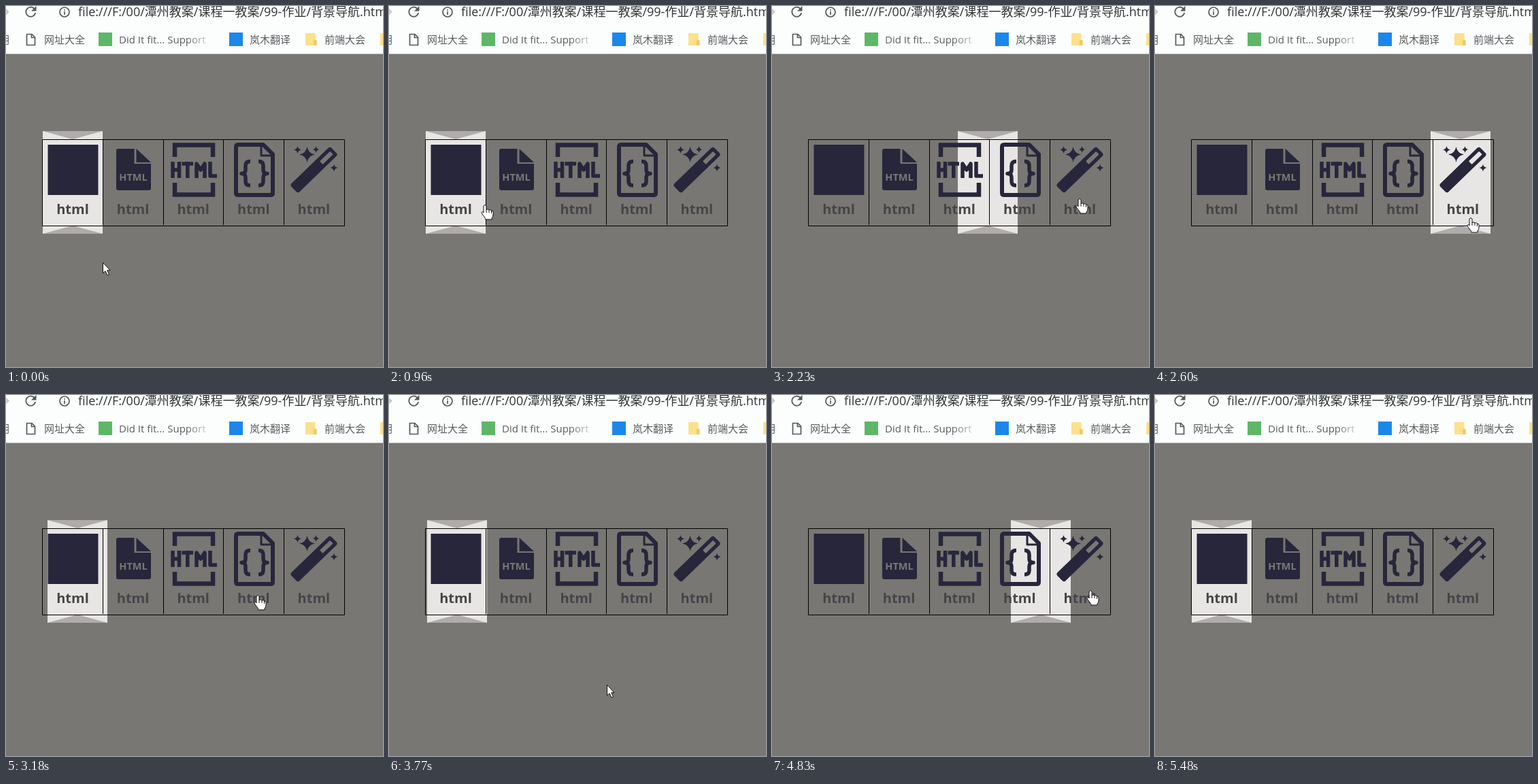
An HTML page for the animation above (5.98 s loop, 554 by 531 pixels).

```html
<!DOCTYPE html>
<html lang="zh">
<head>
<meta charset="utf-8">
<title>Ribbon navigation</title>
<style>
html, body { margin: 0; width: 100%; height: 100%; overflow: hidden; background: #787774; }
svg { display: block; width: 554px; height: 531px; font-family: "Open Sans", "Noto Sans CJK SC", "Noto Sans CJK", sans-serif; }
.mark { font-size: 15px; fill: #5a5c5f; }
.label { font-size: 20px; font-weight: 700; fill: #464447; text-anchor: middle; }
.line { fill: none; stroke: #27263a; stroke-linejoin: round; }
.grey { fill: none; stroke: #55585c; stroke-width: 1.7; }
</style>
</head>
<body>
<svg viewBox="0 0 554 531">
  <defs>
    <linearGradient id="fade" gradientUnits="userSpaceOnUse" x1="265" y1="0" x2="306" y2="0">
      <stop stop-color="#5a5c5f"/><stop offset="1" stop-color="#5a5c5f" stop-opacity="0"/>
    </linearGradient>
    <mask id="cut" maskUnits="userSpaceOnUse" x="155" y="200" width="65" height="80">
      <rect x="155" y="200" width="65" height="80" fill="#fff"/>
      <text x="187" y="257" font-size="14.5" font-weight="700" text-anchor="middle">HTML</text>
    </mask>
    <g id="folder">
      <path d="M0 0H14.5V9L16.500 11V18H0Z" fill="#fce08a"/>
      <path d="M12 18V10H15.500L16.500 11V18Z" fill="#f3ca5d"/>
    </g>
    <path id="spark" d="M0-1Q.15-.15 1 0 .15.15 0 1-.15.15-1 0-.15-.15 0-1Z"/>
  </defs>

  <rect width="554" height="531" fill="#787774"/>

  <!-- browser bar -->
  <rect width="554" height="70" fill="#fcfdfd"/>
  <path d="M0 70.5H554" stroke="#b9b9b8"/>
  <path d="M-4 8.5H3M-2 3L3.500 8.500-2 14" class="grey" opacity=".35"/>
  <path d="M42.300 5A7 7 0 1 0 43.200 10" class="grey"/>
  <path d="M44.500 0V7.500H37Z" fill="#55585c"/>
  <circle cx="86" cy="9" r="7" class="grey"/>
  <path d="M86 8V13M86 5V6.700" class="grey"/>
  <text x="106" y="15" font-size="18" fill="#323437">file:///F:/00/潭州教案/课程一教案/99-作业/背景导航.html</text>

  <g class="mark">
    <text x="-9.5" y="55">用</text>
    <text x="56" y="55">网址大全</text>
    <text x="166" y="55" fill="url(#fade)">Did It fit... Support</text>
    <text x="358" y="55">岚木翻译</text>
    <text x="468" y="55">前端大会</text>
  </g>
  <path d="M30.500 41.500H38L42.500 46V57.500H30.500ZM37.500 41.500V46.500H42.500" class="grey"/>
  <rect x="136" y="39" width="20" height="20" fill="#5db766"/>
  <rect x="328" y="39" width="20" height="20" fill="#1b87ea"/>
  <use href="#folder" x="440" y="40"/>
  <use href="#folder" x="550" y="40"/>

  <g id="ribbon">
    <path d="M0 184H88V335H0Z" fill="#e8e6e4"/>
    <path d="M0 184H88L44 196ZM0 335H88L44 323Z" fill="#b0acab"/>
  </g>

  <g fill="#27263a">
    <rect x="61.5" y="204" width="74" height="74"/>
    <g mask="url(#cut)">
      <path d="M165 210H188.500V232H213V268Q213 271 210 271H165Q162 271 162 268V213Q162 210 165 210Z"/>
      <path d="M191.500 210L213 230H191.500Z"/>
    </g>
    <g class="line" stroke-width="5.5">
      <path d="M248 222V204.500H304V222M248 260V277.500H304V260" stroke-width="6.5" stroke-linejoin="miter"/>
      <path d="M245 229V253M254.500 229V253M245 241H254.500M258.500 232H275M266.800 229V253M280 253V232L286 241 292 232V253M300 229V250H310"/>
      <path d="M341 204H378L392 218V275Q392 278 389 278H341Q338 278 338 275V207Q338 204 341 204Z" stroke-width="6"/>
      <path d="M375 204V220H392" stroke-width="3"/>
      <path id="brace" d="M359 228.500Q352 228.500 352 235V241Q352 246.500 346 246.500 352 246.500 352 252V258Q352 264 359 264"/>
      <use href="#brace" transform="translate(730) scale(-1 1)"/>
    </g>
    <g transform="translate(452.5 241) rotate(-44)">
      <rect x="-41" y="-8.5" width="82" height="17" rx="3.5"/>
    </g>
    <use href="#spark" transform="translate(442.5 218.5) scale(11.5)"/>
    <use href="#spark" transform="translate(428.5 211.5) scale(5.5)"/>
    <use href="#spark" transform="translate(455.5 211) scale(5)"/>
    <use href="#spark" transform="translate(482 238) scale(5.5)"/>
  </g>
  <!-- the wand's hollow tip shows the page, or the ribbon behind it -->
  <clipPath id="tip"><rect x="15" y="-3.2" width="21" height="6.4" rx="1" transform="translate(452.5 241) rotate(-44)"/></clipPath>
  <g clip-path="url(#tip)">
    <rect x="455" y="205" width="35" height="35" fill="#787774"/>
    <use href="#ribbon"/>
  </g>

  <g id="labels" class="label"></g>
  <path id="grid" fill="none" stroke="#000"/>

  <g id="cursor" fill="#fff" stroke="#111" stroke-linejoin="round">
    <path id="arrow" d="M.5.5V16L4 12.800 7 19 9.500 18 6.700 11.800H11Z"/>
    <g id="hand">
      <path d="M-2 2Q0-1 2 2V7.500Q4 6 6 8 8 7 9.500 9 12 8.800 12 11.500V15Q12 18 10 20V22H.8V20.500L-4 14Q-6 11-4 10.500-3 10.300-2 12Z"/>
      <path d="M2 7V12M6 8V12M9.500 9V13" fill="none"/>
    </g>
  </g>
</svg>
<script>
const LOOP = 5980, REST = 5480, GONE = 5440;
const LEFT = 54, TOP = 196, CELLS = 5, STEP = 88.6, BOTTOM = 324;
const LAG = 36, TAU = 100; // ms until the ribbon reacts, and its easing time

// turning points of the pointer: time, x, y
const path = [
  [480, 142, 377], [960, 141, 292], [1070, 141, 292], [1570, 188, 283], [1630, 188, 283],
  [2127, 318, 285], [2230, 452, 283], [2340, 486, 288], [2752, 452, 324], [3024, 387, 428],
  [3180, 370, 294], [3580, 335, 425], [3770, 320, 426], [3850, 312, 440], [4040, 278, 300],
  [4210, 305, 380], [4350, 345, 296], [4732, 396, 290], [4830, 468, 287], [GONE, 400, 532]
];

const el = id => document.getElementById(id);
const ribbon = el("ribbon"), cursor = el("cursor"), arrow = el("arrow"), hand = el("hand");
const show = (node, on) => node.setAttribute("visibility", on ? "visible" : "hidden");
const move = (node, x, y) => node.setAttribute("transform", `translate(${x} ${y})`);

function pointerAt(t) {
  const i = path.findIndex(p => p[0] >= t);
  if (i <= 0) return path.at(i).slice(1);
  const [t0, x0, y0] = path[i - 1], [t1, x1, y1] = path[i];
  const k = (t - t0) / (t1 - t0);
  return [x0 + (x1 - x0) * k, y0 + (y1 - y0) * k];
}

// index of the cell under a point, or -1
function cellAt([x, y]) {
  const cell = Math.floor((x - LEFT) / STEP);
  return y > TOP && y < BOTTOM && cell < CELLS ? cell : -1;
}

// the ribbon chases the hovered cell and falls back to the first, one step per ms
const trail = [LEFT];
for (let t = 1; t < REST; t++) {
  const goal = LEFT + STEP * Math.max(0, cellAt(pointerAt(t - LAG)));
  trail.push(goal + (trail[t - 1] - goal) * Math.exp(-1 / TAU));
}

function draw(t) {
  move(ribbon, Math.round(trail[Math.floor(t)] ?? LEFT), 0);
  const tip = pointerAt(t), inside = cellAt(tip) >= 0;
  move(cursor, ...tip.map(Math.round));
  show(arrow, t < GONE && !inside);
  show(hand, t < GONE && inside);
}

let grid = "M53.5 196.5H497.5V323.5H53.5Z";
for (let i = 0; i < CELLS; i++) {
  const label = document.createElementNS("http://www.w3.org/2000/svg", "text");
  label.textContent = "html";
  label.setAttribute("x", 98 + STEP * i);
  label.setAttribute("y", 306);
  el("labels").append(label);
  if (i) grid += `M${Math.floor(LEFT + STEP * i) + 0.5} 197V322`;
}
el("grid").setAttribute("d", grid);

const start = performance.now();
function tick() {
  draw((performance.now() - start) % LOOP);
  requestAnimationFrame(tick);
}
draw(0);
requestAnimationFrame(tick);
</script>
</body>
</html>
```
